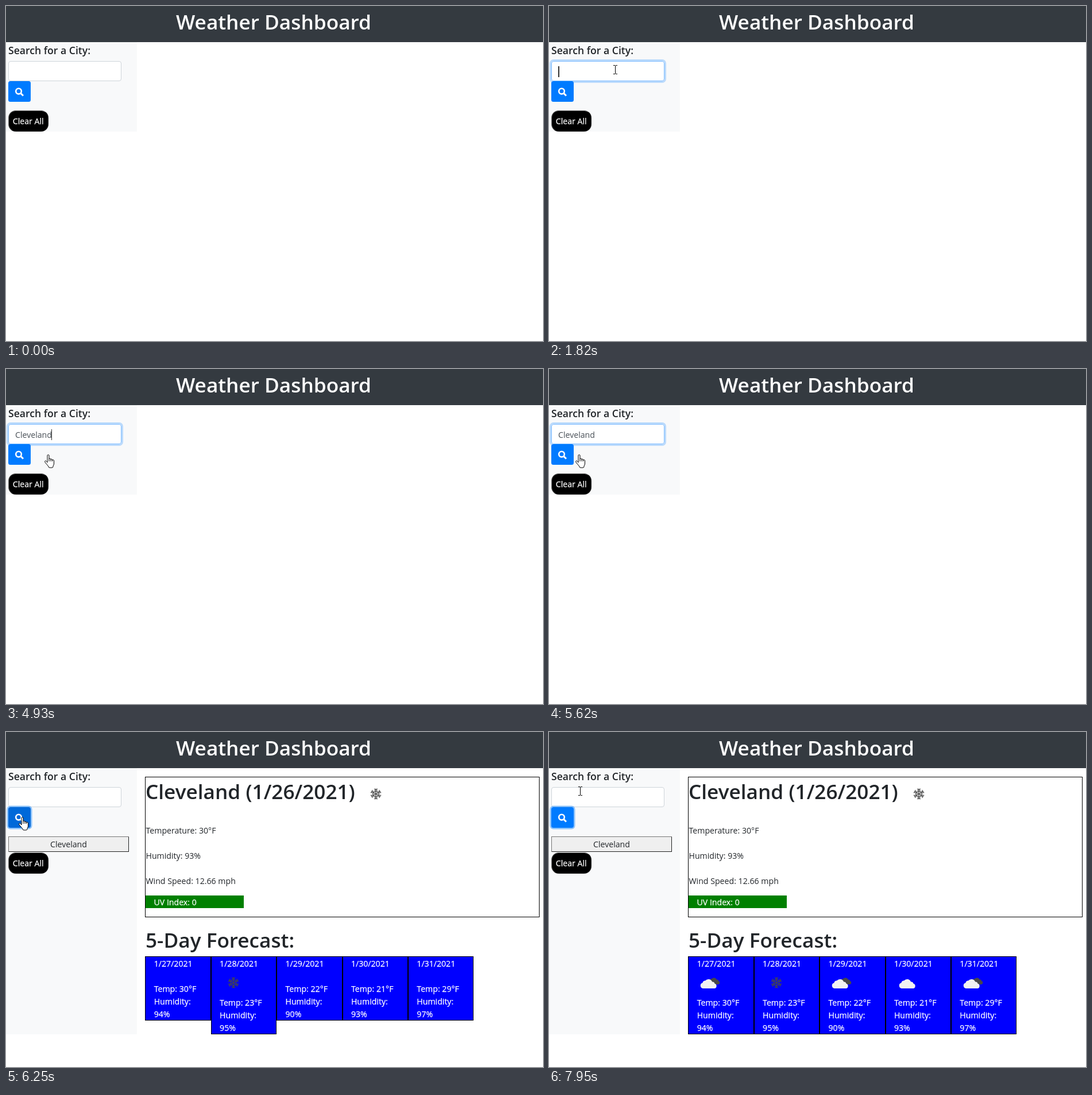
An HTML page that plays this animation: 935 by 584 pixels, repeating every 8000 ms.

```html
<!DOCTYPE html>
<html lang="en">
<head>
<meta charset="utf-8">
<title>Weather Dashboard</title>
<style>
  html, body { margin: 0; width: 100%; height: 100%; overflow: hidden; background: #fff; }
  svg { display: block; width: 935px; height: 584px; }
  text { font: 14.15px "Open Sans", "Noto Sans", sans-serif; fill: #212529; white-space: pre; }
  text.head { font-size: 35.2px; font-weight: 600; }
  text.label { font-size: 17.6px; font-weight: 600; }
  text.white, .white text { fill: #fff; stroke: #fff; stroke-width: .25; }
  text.head.white { stroke: none; }
</style>
</head>
<body>
<svg viewBox="0 0 935 584">
  <defs>
    <g id="flake" fill="none" stroke="#484848" stroke-width="1.25"></g>
    <path id="cloud" d="M-10 9a5 5 0 0 1-.5-9.8a4.5 4.5 0 0 1 4.6-3.6a7 7 0 0 1 12 1.8a4.3 4.3 0 0 1 4.5 3.4a4.2 4.2 0 0 1-.6 8.2z"/>
    <linearGradient id="outset" x2="1" y2="1">
      <stop offset=".5" stop-color="#767676"/>
      <stop offset=".5" stop-color="#212121"/>
    </linearGradient>
  </defs>

  <rect width="935" height="63" fill="#343a40"/>
  <text class="head white" x="466" y="41" text-anchor="middle">Weather Dashboard</text>

  <rect id="side" y="63" width="228" height="156" fill="#f8f9fa"/>
  <text class="label" x="4" y="84">Search for a City:</text>
  <rect id="inputRing" x="2.5" y="94.5" width="200" height="38" rx="5.5" fill="none" stroke="#007bff" stroke-opacity=".25" stroke-width="3"/>
  <rect id="input" x="4.5" y="96.5" width="196" height="34" rx="3.5" fill="#fff" stroke="#ced4da"/>
  <text id="typed" x="16" y="120" style="fill:#495057"></text>
  <rect id="caret" y="105" width="1" height="19" fill="#333"/>
  <rect id="buttonRing" x="2.75" y="129.75" width="41.5" height="38.5" rx="5" fill="none" stroke="#268fff" stroke-opacity=".5" stroke-width="2.5"/>
  <rect id="button" x="4" y="131" width="39" height="36" rx="3.5"/>
  <g fill="none" stroke="#fff" stroke-width="2.6">
    <circle cx="22" cy="148.6" r="4.8"/>
    <path d="M25.5 152L30 156.5" stroke-width="3"/>
  </g>

  <g id="clear">
    <rect x="4.5" y="182.5" width="69" height="36" rx="12" stroke="url(#outset)"/>
    <text class="white" x="38.7" y="206" text-anchor="middle">Clear All</text>
  </g>

  <g id="results">
    <rect x="4.5" y="182.5" width="209" height="26" fill="#efefef" stroke="url(#outset)"/>
    <text x="109" y="201" text-anchor="middle">Cleveland</text>
    <rect x="242.5" y="78.5" width="686" height="244" fill="#fff" stroke="#000"/>
    <text class="head" x="243" y="117">Cleveland (1/26/2021)</text>
    <use href="#flake" x="644" y="108"/>
    <text x="243.5" y="177">Temperature: 30°F</text>
    <text x="243.5" y="221">Humidity: 93%</text>
    <text x="243.5" y="265">Wind Speed: 12.66 mph</text>
    <rect x="243" y="285" width="171" height="22" fill="#008000"/>
    <text class="white" x="257.5" y="302">UV Index: 0</text>
    <text class="head" x="243" y="376">5-Day Forecast:</text>
    <g id="cards" class="white"></g>
  </g>

  <g id="cursor" stroke="#000" fill="#fff" stroke-linejoin="round">
    <path id="arrow" d="M.5 .5V17L4.3 13.4L7 19L9.3 18L6.8 12.4H12Z"/>
    <path id="beam" fill="none" d="M-3.5-7.5h3m1 0h3M0-7V7M-3.5 7.5h3m1 0h3"/>
    <g id="hand">
      <path d="M-1 14V2Q-1 .5 .5 .5T2 2V8Q2 7 3.5 7T5 9Q5 7.8 6.3 8T7.7 10Q8 9 9.2 9.2T10.5 11V16Q10.5 18 9 20V21Q9 23 7 23H3Q1 23 1 21Q-2 17-4.8 14Q-6 12-4.8 11.2T-2.5 12Z"/>
      <path d="M2 8v4M5 9v3M7.7 10v2" fill="none"/>
    </g>
  </g>
</svg>
<script>
const LOOP = 8000, RESULTS = 6250, ICONS = 6310;
const $ = id => document.getElementById(id);
const set = (id, attrs) => {
  for (const k in attrs) $(id).setAttribute(k, attrs[k]);
};
const show = (id, on) => set(id, { visibility: on ? 'visible' : 'hidden' });
const ramp = (t, a, b) => Math.min(1, Math.max(0, (t - a) / (b - a)));

// Snowflake: six branched arms
$('flake').innerHTML = [0, 60, 120, 180, 240, 300].map(a =>
  `<path transform="rotate(${a})" d="M0 0V-9.5M-2.8-9L0-6.4L2.8-9M-2.6-5.8L0-3.4L2.6-5.8"/>`).join('');

// Forecast: date, temperature, humidity, sky
const days = [
  ['1/27/2021', 30, 94, 'broken'],
  ['1/28/2021', 23, 95, 'snow'],
  ['1/29/2021', 22, 90, 'broken'],
  ['1/30/2021', 21, 93, 'cloud'],
  ['1/31/2021', 29, 97, 'broken']
];

function skyIcon(sky, x) {
  if (sky === 'snow') return `<use href="#flake" x="${x + 39}" y="437"/>`;
  const front = dx => `<use href="#cloud" x="${x + dx}" y="438" fill="#f2f2f2"/>`;
  if (sky === 'cloud') return front(38);
  return `<use href="#cloud" transform="translate(${x + 45.5} 433.5) scale(.72)" fill="#484848"/>` + front(36);
}

function drawCards(loaded) {
  const left = i => Math.ceil(242 + i * 114.4);
  $('cards').innerHTML = days.map(([date, temp, hum, sky], i) => {
    const x = left(i), tx = 257.7 + i * 114.4;
    const icon = loaded || sky === 'snow', drop = icon ? 24 : 0;
    const line = (y, s) => `<text x="${tx}" y="${y}">${s}</text>`;
    return `<rect x="${x + .5}" y="391.5" width="${left(i + 1) - x - 1}" height="${111 + drop}" fill="#00f" stroke="#000"/>` +
      line(409, date) + (icon ? skyIcon(sky, x) : '') +
      line(453 + drop, `Temp: ${temp}°F`) + line(475 + drop, 'Humidity:') + line(497 + drop, hum + '%');
  }).join('');
}

// Pointer moves: start, end, number of steps, way points
const moves = [
  [210, 980, 11, [[870, 578], [600, 420], [330, 260], [150, 160], [90, 140], [76, 156]]],
  [1210, 1820, 9, [[80, 152], [100, 127], [114, 112], [115, 111], [115, 111]]],
  [4540, 4720, 3, [[107, 106], [92, 97], [79, 114]]],
  [4930, 5700, 11, [[73, 149], [112, 154], [140, 151], [125, 153], [80, 150], [45, 149], [28, 148]]],
  [7410, 7950, 8, [[30, 146], [42, 130], [50, 112], [54, 103]]]
];

function pointer(t) {
  const move = moves.filter(m => m[0] <= t).pop();
  if (!move) return null;
  const [a, b, n, pts] = move;
  const step = Math.floor(ramp(t, a, b) * (n - 1) + .001) / (n - 1);
  const pos = step * (pts.length - 1);
  const i = Math.min(Math.floor(pos), pts.length - 2), f = pos - i;
  return [0, 1].map(k => Math.round(pts[i][k] + (pts[i + 1][k] - pts[i][k]) * f));
}

// Keystrokes: time and letters present
const keys = [[2300, 1], [2680, 2], [3060, 3], [3140, 4], [3290, 5], [3380, 6], [3520, 8], [3610, 9]];
const blinks = [[2220, 2300], [4160, 4720], [5260, 5770]];

function drawInput(t) {
  const key = keys.filter(k => k[0] <= t).pop();
  const word = key && t < RESULTS ? 'Cleveland'.slice(0, key[1]) : '';
  const typed = $('typed');
  if (typed.textContent !== word) typed.textContent = word;
  const width = word ? typed.getComputedTextLength() : 0;
  set('caret', { x: Math.round(16 + width - (word ? .7 : 0)), width: word ? 1 : 2 });
  show('caret', t >= 1740 && t < 5770 && !blinks.some(([a, b]) => t >= a && t < b));
  const focus = ramp(t, 1670, 1820) - ramp(t, 5770, 5920);
  const mix = (a, b) => Math.round(a + (b - a) * focus);
  set('inputRing', { opacity: focus });
  set('input', { stroke: `rgb(${mix(206, 128)},${mix(212, 189)},${mix(218, 255)})` });
}

function drawPointer(t) {
  const p = pointer(t);
  show('cursor', p);
  const [x, y] = p || [900, 600];
  const onRow = x < 75 && y >= 131 && y < 167;
  const onInput = x < 201 && y >= 96 && y < 131;
  const kind = onRow ? 'hand' : onInput ? 'beam' : 'arrow';
  for (const k of ['arrow', 'beam', 'hand'])
    set(k, { display: k === kind ? 'inline' : 'none' });
  const shift = kind === 'beam' ? .5 : 0;
  set('cursor', { transform: `translate(${x + shift} ${y})` });
  set('button', { fill: onRow && x < 43 ? '#0069d9' : '#007bff' });
}

let loaded = null;

function draw(t) {
  const done = t >= RESULTS;
  drawInput(t);
  drawPointer(t);
  set('buttonRing', { opacity: ramp(t, 5770, 5920) });
  set('side', { height: done ? 464 : 156 });
  set('clear', { transform: `translate(0 ${done ? 28 : 0})` });
  set('results', { display: done ? 'inline' : 'none' });
  if (loaded !== t >= ICONS) drawCards(loaded = t >= ICONS);
}

const start = performance.now();
function tick() {
  draw((performance.now() - start) % LOOP);
  requestAnimationFrame(tick);
}
draw(0);
requestAnimationFrame(tick);
</script>
</body>
</html>
```
